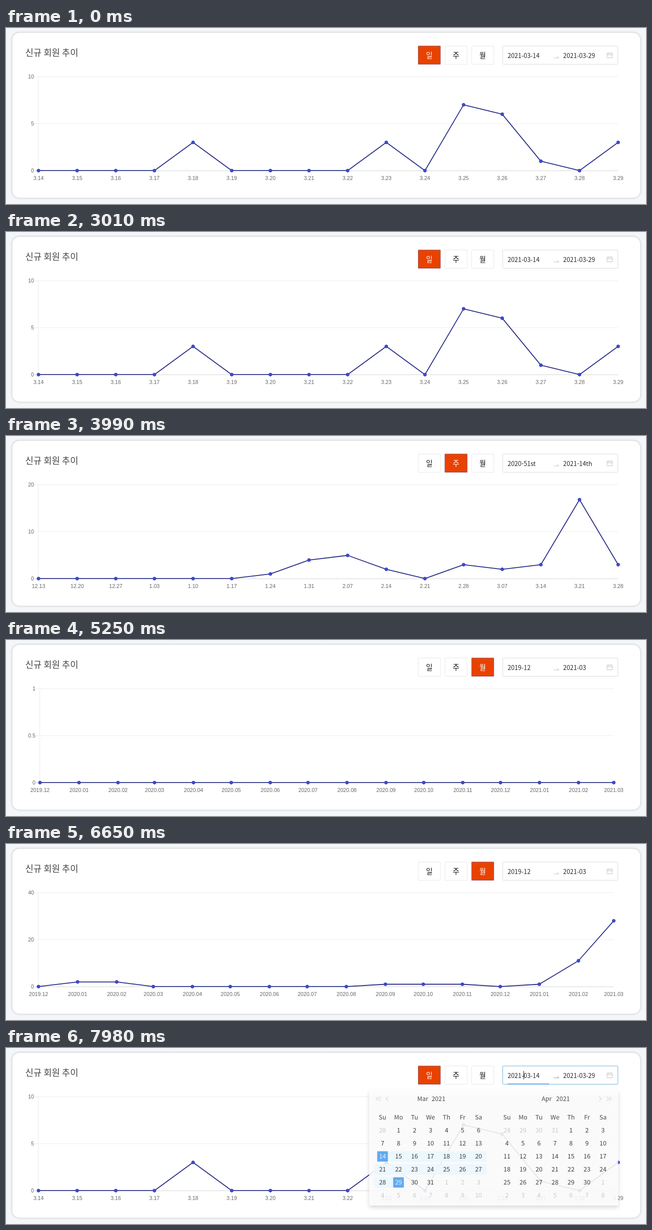
An HTML page with a canvas that plays this animation: 1280x352 px, repeating every 8000 ms.

```html
<!DOCTYPE html>
<html lang="ko">
<head>
<meta charset="utf-8">
<title>신규 회원 추이</title>
<style>
  html, body { margin: 0; width: 1280px; height: 352px; overflow: hidden; }
  canvas { display: block; }
</style>
</head>
<body>
<canvas id="stage" width="1280" height="352"></canvas>
<script>
const ctx = document.getElementById('stage').getContext('2d');
const LOOP = 8000;
const SANS = '"Noto Sans CJK KR", "Noto Sans CJK", "Noto Sans", sans-serif';
const CHART_FONT = '10.67px "Liberation Sans", Arial, sans-serif';
const BODY_FONT = '12.44px ' + SANS;
const TOP = 97, BOTTOM = 285;
const OPEN_AT = 7912, FOCUS_AT = 7880, HOVER_AT = 7210;

const pad = n => String(n).padStart(2, '0');
const monthDay = d => `${d.getUTCMonth() + 1}.${pad(d.getUTCDate())}`;
const yearMonth = d => `${d.getUTCFullYear()}.${pad(d.getUTCMonth() + 1)}`;

function makeMode(button, range, max, right, values, dateAt, format) {
  const dates = values.map((_, i) => new Date(dateAt(i)));
  const span = dates[dates.length - 1] - dates[0];
  return { button, range, max, right, values,
    labels: dates.map(format), at: dates.map(d => (d - dates[0]) / span) };
}
const day = makeMode(0, ['2021-03-14', '2021-03-29'], 10, 1224.3,
  [0, 0, 0, 0, 3, 0, 0, 0, 0, 3, 0, 7, 6, 1, 0, 3],
  i => Date.UTC(2021, 2, 14 + i), monthDay);
const week = makeMode(1, ['2020-51st', '2021-14th'], 20, 1224.3,
  [0, 0, 0, 0, 0, 0, 1, 4, 5, 2, 0, 3, 2, 3, 17, 3],
  i => Date.UTC(2020, 11, 13 + 7 * i), monthDay);
const month = makeMode(2, ['2019-12', '2021-03'], 40, 1215.5,
  [0, 2, 2, 0, 0, 0, 0, 0, 0, 1, 1, 1, 0, 1, 11, 28],
  i => Date.UTC(2019, 11 + i, 1), yearMonth);

// click: the mode switches to an empty chart; data: its values start to rise
const timeline = [
  { mode: day, click: 0, data: -2000 },
  { mode: week, click: 3150, data: 3320 },
  { mode: month, click: 5180, data: 5370 },
  { mode: day, click: 6720, data: 6796 },
];

const progress = (t, start, length) => Math.min(1, Math.max(0, (t - start) / length));
const easeOut = (p, power) => 1 - (1 - p) ** power;

function text(str, x, y, font, color, align = 'left') {
  ctx.font = font;
  ctx.fillStyle = color;
  ctx.textAlign = align;
  ctx.fillText(str, x, y + parseFloat(font.match(/[\d.]+px/)[0]) * 0.365);
}

function path(points, color, width = 1) {
  ctx.beginPath();
  points.forEach(([x, y]) => ctx.lineTo(x, y));
  ctx.strokeStyle = color;
  ctx.lineWidth = width;
  ctx.stroke();
}

function box(x, y, w, h, fill, stroke, radius = 0) {
  ctx.beginPath();
  ctx.roundRect(x, y, w, h, radius);
  if (fill) { ctx.fillStyle = fill; ctx.fill(); }
  if (stroke) { ctx.strokeStyle = stroke; ctx.lineWidth = 1; ctx.stroke(); }
}

function shadow(color, blur, y) {
  ctx.shadowColor = color;
  ctx.shadowBlur = blur;
  ctx.shadowOffsetY = y;
}

function drawCard() {
  ctx.fillStyle = '#f5f6f9';
  ctx.fillRect(0, 0, 1280, 352);
  ctx.save();
  shadow('rgba(90,110,120,.3)', 4, 0);
  box(12, 9, 1257, 331, '#fff', null, 15);
  ctx.restore();
  box(12, 9, 1257, 331, null, '#d7dde0', 15);
  text('신규 회원 추이', 38.5, 50, '500 17.78px ' + SANS, '#444');
}

function drawButtons(active) {
  ['일', '주', '월'].forEach((label, i) => {
    const on = i === active, x = 824.5 + 53.4 * i;
    box(x, 36, 44.3, 36.5, on ? '#e94200' : '#fff', on ? '#985362' : '#e8e8e8');
    text(label, x + 22.1, 54.5, '500 14.22px ' + SANS, on ? '#fff' : '#111', 'center');
  });
}

function drawInput(range, t) {
  const focus = t >= FOCUS_AT;
  const border = focus ? '#72b2d8' : t >= HOVER_AT ? '#b2b7c2' : '#dcdcdc';
  box(993.5, 36, 230.3, 36.5, '#fff', border, 1);
  text(range[0], 1003.3, 55, BODY_FONT, '#262626');
  text(range[1], 1114.3, 55, BODY_FONT, '#262626');
  path([[1095.5, 59.8], [1106, 59.8], [1102.5, 56.3]], focus ? '#999' : '#bfbfbf');
  box(1202, 50.5, 10.5, 9, null, '#c4c4c4');
  path([[1202, 53.5], [1212.5, 53.5]], '#c4c4c4');
  for (const x of [1204.5, 1210]) path([[x, 48.5], [x, 51.5]], '#c4c4c4');
  if (focus) {
    ctx.fillStyle = '#64aae8';
    ctx.fillRect(1003.5, 71, 82.5, 2);
    path([[1035.5, 46], [1035.5, 63]], '#222');
  }
}

function drawChart({ mode, data }, t) {
  const loading = t < data;
  const rise = easeOut(progress(t, data, 1000), 4);
  const left = loading ? 68 : 65;
  const max = loading ? 1 : mode.max;
  const xAt = (i, from) => from + mode.at[i] * (mode.right - from);

  for (const k of [0, 0.5, 1]) {
    const y = BOTTOM - k * (BOTTOM - TOP);
    const lineY = Math.floor(y) + 0.5;
    path([[left - 8, lineY], [mode.right, lineY]], k ? '#ededed' : '#d6d6d6');
    text(String(max * k), left - 9, y, CHART_FONT, '#666', 'right');
  }
  path([[left - 0.5, TOP], [left - 0.5, BOTTOM + 1]], '#ebebeb');
  mode.labels.forEach((label, i) =>
    text(label, xAt(i, left), 300, CHART_FONT, '#666', 'center'));

  const points = mode.values.map((v, i) => [
    xAt(i, 68 - 3 * rise),
    BOTTOM + 0.2 - (BOTTOM - TOP) * v * rise / mode.max,
  ]);
  ctx.lineJoin = 'round';
  path(points, '#2a2f86', 1.8);
  for (const [x, y] of points) {
    ctx.beginPath();
    ctx.arc(x, y, 3.1, 0, 7);
    ctx.fillStyle = '#3b4ce4';
    ctx.fill();
    ctx.strokeStyle = '#2c349f';
    ctx.lineWidth = 0.9;
    ctx.stroke();
  }
}

function chevron(x, dir) {
  path([[x + 2.3 * dir, 13.6], [x - 2.3 * dir, 17.8], [x + 2.3 * dir, 22]], '#bbb');
}

const colX = c => 26.7 + 32 * c;
const rowY = r => 56 + 26.67 * r;

function drawMonth(index, name) {
  const first = new Date(2021, index, 1).getDay();
  ['Su', 'Mo', 'Tu', 'We', 'Th', 'Fr', 'Sa'].forEach((d, c) =>
    text(d, colX(c), rowY(0), BODY_FONT, '#333', 'center'));
  text(name, 96, 17.3, BODY_FONT, '#333');
  text('2021', 124.8, 17.3, BODY_FONT, '#333');
  for (let i = 0; i < 42; i++) {
    const date = new Date(2021, index, 1 - first + i);
    const inside = date.getMonth() === index, n = date.getDate();
    const x = colX(i % 7), y = rowY(1 + Math.floor(i / 7));
    const end = inside && index === 2 && (n === 14 || n === 29);
    if (end) box(x - 10.7, y - 10.7, 21.3, 21.3, '#4c9fee', null, 1);
    text(String(n), x, y, BODY_FONT, end ? '#fff' : inside ? '#262626' : '#c3c3c3', 'center');
  }
}

function drawCalendar(t) {
  const p = easeOut(progress(t, OPEN_AT, 200), 5);
  if (!p) return;
  ctx.save();
  ctx.globalAlpha = p;
  ctx.translate(726.4, 84.2);
  ctx.scale(1, 0.8 + 0.2 * p);
  ctx.save();
  shadow('rgba(0,0,0,.18)', 9, 4);
  box(0, 0, 498, 236.4, '#fff', null, 2);
  ctx.restore();
  chevron(16.2, 1); chevron(21.2, 1); chevron(35.6, 1);
  chevron(462, -1); chevron(477, -1); chevron(482, -1);
  ctx.fillStyle = '#ebf8ff';
  [[3, 26.7, 234.7], [4, 10.7, 234.7], [5, 10.7, 58.7]].forEach(([r, a, b]) =>
    ctx.fillRect(a, rowY(r) - 10.7, b - a, 21.3));
  drawMonth(2, 'Mar');
  ctx.translate(248.9, 0);
  drawMonth(3, 'Apr');
  ctx.restore();
}

function draw(now) {
  const t = now % LOOP;
  const stage = timeline.filter(s => t >= s.click).pop();
  drawCard();
  drawButtons(stage.mode.button);
  drawInput(stage.mode.range, t);
  drawChart(stage, t);
  drawCalendar(t);
}

const start = performance.now();
function tick() {
  draw(performance.now() - start);
  requestAnimationFrame(tick);
}
tick();
</script>
</body>
</html>
```
